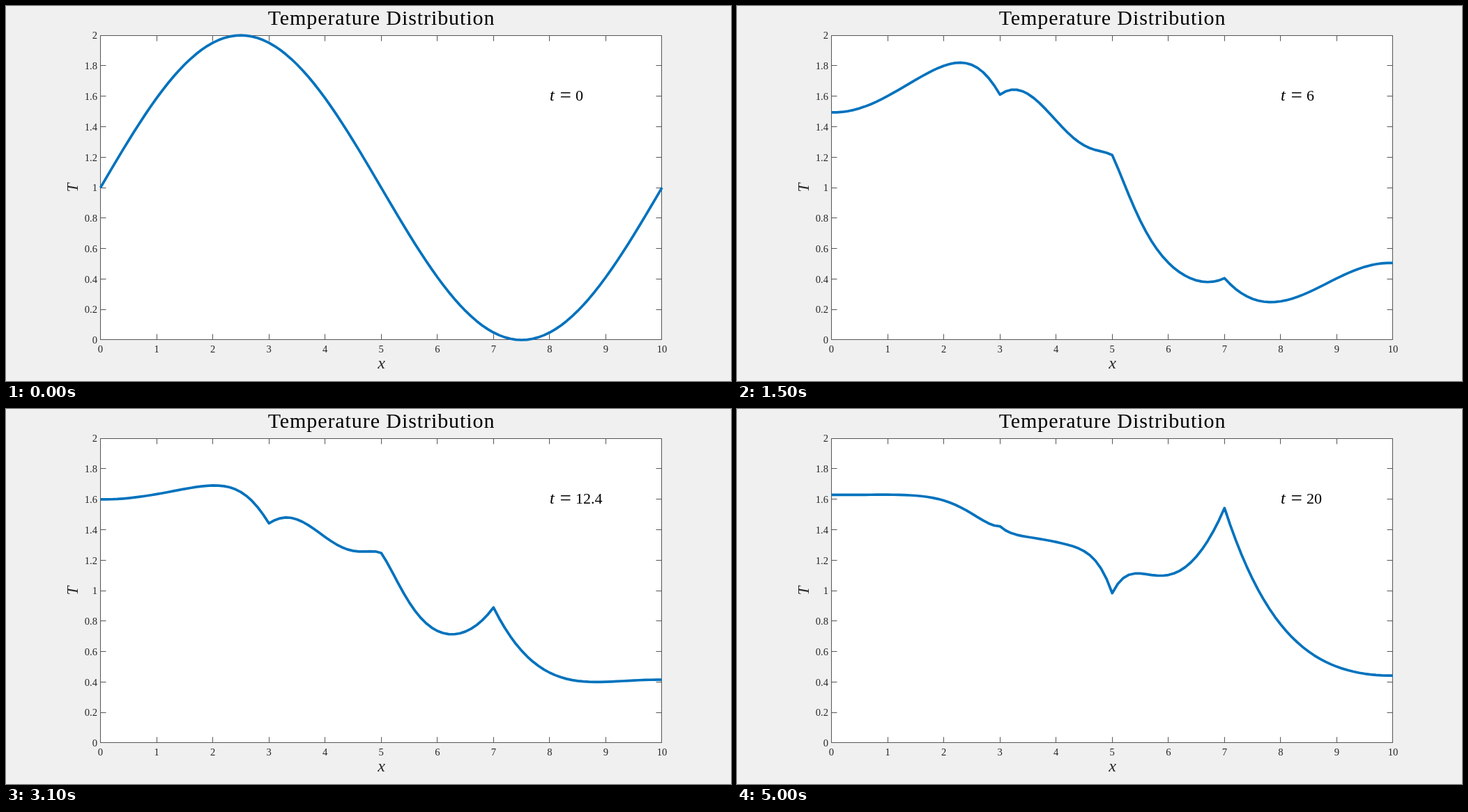
An HTML page for the animation above (5100 ms loop, 1040x539 px).

```html
<!DOCTYPE html>
<html lang="en">
<head>
<meta charset="utf-8">
<title>Temperature Distribution</title>
<style>
  html, body { margin: 0; width: 100%; height: 100%; overflow: hidden; background: #f0f0f0; }
  svg { display: block; width: 1040px; height: 539px; }
  text { font-family: "Liberation Serif", "Times New Roman", serif; }
  .num { font-size: 14.6px; fill: #262626; }
  .it { font-style: italic; }
</style>
</head>
<body>
<svg viewBox="0 0 1040 539">
  <rect x="135.5" y="42.5" width="805" height="437" fill="#fff"/>
  <path id="axes" fill="none" stroke="#555"/>
  <g id="labels" class="num"></g>
  <text x="538.5" y="27" font-size="30" letter-spacing=".92" text-anchor="middle">Temperature Distribution</text>
  <text x="538.5" y="521" font-size="24" text-anchor="middle" class="it" fill="#262626">x</text>
  <text transform="translate(103 261) rotate(-90)" font-size="23" text-anchor="middle" class="it" fill="#262626">T</text>
  <polyline id="curve" fill="none" stroke="#0072bd" stroke-width="3.7" stroke-linejoin="round"/>
  <text y="135.5" font-size="22"><tspan x="780" font-size="24" class="it">t</tspan><tspan x="794.5" dy="2" font-size="29">=</tspan><tspan x="817" dy="-2" id="clock">0</tspan></text>
</svg>
<script>
const $ = id => document.getElementById(id);
const px = x => 135.5 + 80.55 * x;
const py = T => 480 - 218.9 * T;
const snap = v => Math.floor(v) + 0.5;

// Axes box, inward ticks and tick labels
let path = 'M135.5 42.5H940.5V479.5H135.5Z', labels = '';
const label = (x, y, anchor, value) =>
  labels += `<text x="${x}" y="${y}" text-anchor="${anchor}">${value}</text>`;
for (let i = 0; i <= 10; i++) {
  const x = Math.min(snap(px(i)), 940.5), y = Math.min(snap(py(i / 5)), 479.5);
  path += `M${x} 42.5v8M${x} 479.5v-8M135.5 ${y}h8M940.5 ${y}h-8`;
  label(px(i), 498, 'middle', i);
  label(131, py(i / 5) + 5.2, 'end', i / 5);
}
$('axes').setAttribute('d', path);
$('labels').innerHTML = labels;

// Heat equation, insulated ends, three point sources
const FRAMES = 51, STEP = 0.4, SUB = 40, DT = STEP / SUB, DX = 0.1, ALPHA = 0.1;
const R = ALPHA * DT / DX ** 2;
const sources = [
  [30, t => Math.sin(t - Math.PI / 4)],
  [50, t => -2 * Math.sin(t)],
  [70, t => 0.1 * t]
];

function advance(T, t) {
  const next = T.map((v, i) => v + R * (T[i - 1] - 2 * v + T[i + 1]));
  for (const [i, heat] of sources) next[i] += DT * heat(t);
  next[0] = next[1];
  next[100] = next[99];
  return next;
}

let T = Array.from({ length: 101 }, (_, i) => 1 + Math.sin(Math.PI * i / 50));
const curves = [];
for (let n = 0; n < FRAMES; n++) {
  curves.push(T.map((v, i) => px(i * DX).toFixed(2) + ',' + py(v).toFixed(2)).join(' '));
  for (let k = 0; k < SUB; k++) T = advance(T, n * STEP + k * DT);
}

let shown = -1;
function draw() {
  const n = Math.floor(performance.now() / 100) % FRAMES;
  if (n !== shown) {
    shown = n;
    $('curve').setAttribute('points', curves[n]);
    $('clock').textContent = +(n * STEP).toFixed(1);
  }
  requestAnimationFrame(draw);
}
draw();
</script>
</body>
</html>
```
